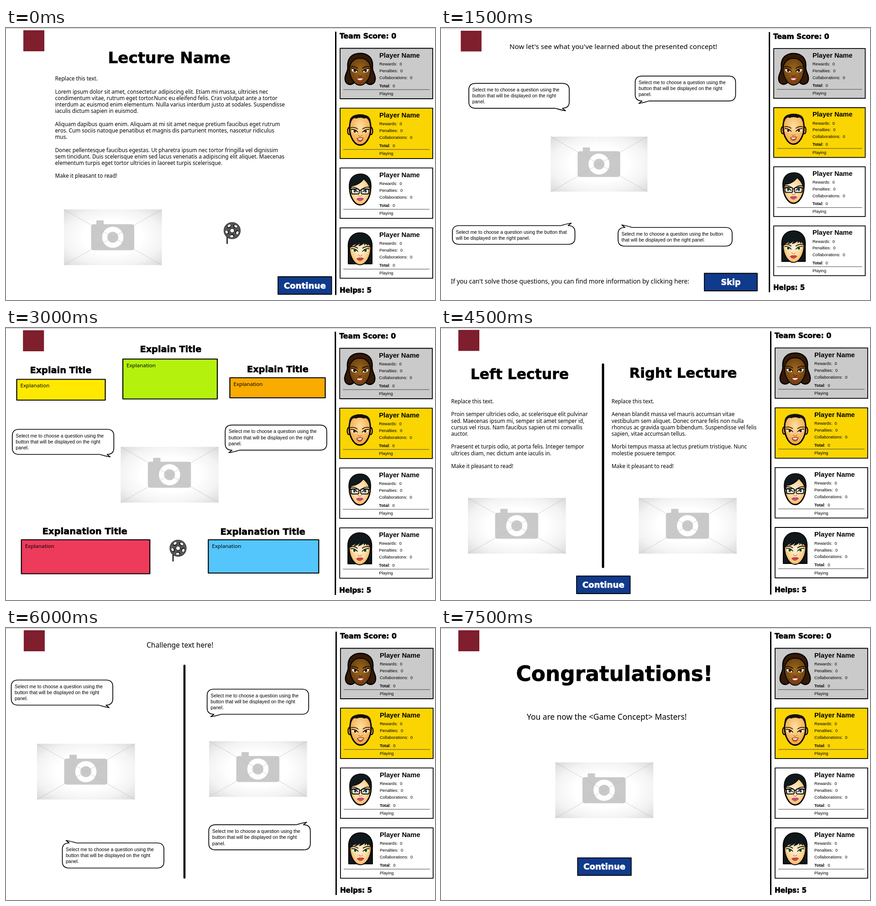
Recreate the animation shown at these times as an HTML page. Size 940 by 596 pixels, loop 9 s.

```html
<!DOCTYPE html>
<html lang="en">
<head>
<meta charset="utf-8">
<title>Lecture game screens</title>
<style>
html, body { margin: 0; width: 100%; height: 100%; overflow: hidden; background: #fff; }
svg { display: block; width: 940px; height: 596px; }
text { white-space: pre; }
.title { font-family: "DejaVu Sans", sans-serif; font-weight: 700; stroke: #000; stroke-width: .7; }
.button { font-family: "DejaVu Sans", sans-serif; font-weight: 700; fill: #fff; stroke: #fff; stroke-width: .8; stroke-linejoin: round; }
.note { font-family: "Noto Sans", sans-serif; }
.plain { font-family: "Liberation Sans", Arial, sans-serif; }
.bold { font-weight: 700; }
</style>
</head>
<body>
<svg id="stage" viewBox="0 0 940 596" xmlns="http://www.w3.org/2000/svg"></svg>
<script>
const SCENE_MS = 1500;

const esc = s => s.replace(/&/g, "&amp;").replace(/</g, "&lt;");
const text = (cls, x, y, size, s, extra = "") =>
  `<text class="${cls}" x="${x}" y="${y}" font-size="${size}" ${extra}>${esc(s)}</text>`;
const lines = (cls, x, y, size, step, rows) =>
  rows.map((row, i) => row && text(cls, x, y + i * step, size, row)).join("");
const rect = (x, y, w, h, fill, extra = "") =>
  `<rect x="${x}" y="${y}" width="${w}" height="${h}" fill="${fill}" ${extra}/>`;
const path = (d, fill, extra = "") => `<path d="${d}" fill="${fill}" ${extra}/>`;
const circle = (x, y, r, fill, extra = "") => `<circle cx="${x}" cy="${y}" r="${r}" fill="${fill}" ${extra}/>`;
const stroke = (w, color = "#000") => `stroke="${color}" stroke-width="${w}" stroke-linejoin="round"`;
const at = (x, y, body, more = "") => `<g transform="translate(${x},${y}) ${more}">${body}</g>`;
const use = (id, x = 0, y = 0, scale = 1) =>
  `<use href="#${id}" transform="translate(${x},${y}) scale(${scale})"/>`;
const title = (x, y, size, s) => text("title", x, y, size, s);

// Avatars: x is measured from the face axis, y from the top of the card.
const HEAD = "M0,15C17,15 24,27 23,45C23,62 13,81 0,81C-13,81 -23,62 -23,45C-24,27 -17,15 0,15Z";

const eyes = (y, iris, brow) => [-1, 1].map(s => at(s * 11, y,
  path("M-5,2Q0,-5 8,-4Q7,4 0,4Q-4,4 -5,2Z", "#fff") +
  circle(.8, 0, 3.2, iris) + circle(.8, 0, 1.5, "#000") +
  path("M-6,2Q0,-5.5 9,-4", "none", stroke(1.7)) +
  path("M-6,-5Q2,-11 10,-8", "none", stroke(1.8, brow)), `scale(${s},1)`)).join("");

const nose = color => path("M-4,59Q-3,62 0,62Q3,62 4,59", "none", stroke(1.3, color));

const smile = (w, lip) =>
  path(`M${-w},66Q0,64 ${w},65Q5,73 0,73Q-6,73 ${-w},66Z`, lip, stroke(.8, "#7a2216")) +
  path(`M${1.5 - w},66.5Q0,66 ${w - 1.5},66Q3,69.5 0,69.5Q-4,69.5 ${1.5 - w},66.5Z`, "#fff");

const lips = color =>
  path("M-8,68Q-3,64 0,66Q3,64 8,67.5Q3,72.5 0,72.5Q-4,72.5 -8,68Z", color, stroke(.6, "#8a2430")) +
  path("M-6,68Q0,69.5 6,67.5", "none", stroke(.8, "#8a2430"));

const faces = [
  () => path("M0,11C-19,11 -29,23 -27,42C-27,53 -34,57 -33,68C-32,80 -20,82 -13,75L13,75C20,82 32,80 33,68C34,57 27,53 27,42C29,23 19,11 0,11Z", "#351a08", stroke(2.6)) +
    path("M0,22C12,21 22,30 23,44C24,62 13,81 0,81C-13,81 -24,62 -23,44C-22,30 -12,21 0,22Z", "url(#brown)", stroke(1.8)) +
    eyes(49, "#6b3b14", "#211004") + nose("#4b2707") + smile(8, "#c73a35"),
  () => [-24, 24].map(x => `<ellipse cx="${x}" cy="50" rx="3.5" ry="8" fill="#f1a94b" ${stroke(2.2)}/>`).join("") +
    path(HEAD, "url(#tan)", stroke(3)) +
    path("M-23,37C-26,16 -11,14 0,14C11,14 26,16 23,37L20,31C18,23 12,20 9,23Q0,19 -9,23C-12,20 -18,23 -20,31Z", "#17100b") +
    eyes(51, "#a05a18", "#3a200a") + nose("#b86e22") + smile(7, "#c9562e"),
  () => path(HEAD, "url(#fair)", stroke(2.8)) +
    path("M-23,49C-28,23 -14,13 1,13C18,13 27,26 23,48L20,42C19,34 13,30 8,24C1,34 -10,39 -19,39L-20,44Z", "#10191d", stroke(1.4)) +
    eyes(51, "#4d9bc5", "#10191d") +
    [-10.5, 10.5].map(x => rect(x - 8.5, 46, 17, 11, "none", `rx="3" ${stroke(1.9)}`)).join("") +
    path("M-2,49H2M-19,48L-23,46M19,48L23,46", "none", stroke(1.9)) +
    nose("#d08b3c") + lips("#e0568c"),
  () => path("M-26,79V44C-28,21 -15,11 0,11C15,11 28,21 26,44V79Z", "#10181b", stroke(2)) +
    path(HEAD, "url(#fair)", stroke(1.8)) +
    path("M-23,46C-26,20 -11,12 0,12C11,12 26,20 23,46Q21,39 17,36L16,40L13,35L9,39L9,34Q2,40 -4,40L0,34Q-8,41 -14,40L-9,35Q-17,39 -20,42Z", "#10181b") +
    eyes(50, "#54a52d", "#10181b") + nose("#d08b3c") + lips("#e24a55")
];

const card = (fill, i) => at(0, 44.5 + i * 131.1,
  rect(732, 0, 203, 110.5, fill, stroke(1.8)) +
  at(776, 0, faces[i]()) +
  text("plain bold", 818, 20, 14.8, "Player Name") +
  lines("plain", 818, 37.6, 9.3, 14.9, ["Rewards:  0", "Penalties:  0", "Collaborations:  0"]) +
  `<text class="plain" x="818" y="85" font-size="9.3"><tspan class="bold">Total</tspan>:  0</text>` +
  path("M739,90.5H928", "none", stroke(1, "#444")) +
  text("plain", 818, 102.7, 9.3, "Playing"));

const panel = rect(38, 5, 46, 46, "#7f1e2c") +
  rect(721, 8, 3, 577, "#000") +
  title(731, 23, 15.7, "Team Score: 0") +
  ["#cacaca", "#fad502", "#fff", "#fff"].map(card).join("") +
  title(731, 579.5, 15.2, "Helps: 5");

const photo = rect(0, 0, 214.5, 122, "url(#vignette)") +
  rect(71, 24, 16, 14, "#c9c9c9") +
  rect(59.5, 32.5, 94.5, 57, "#c9c9c9", `rx="5"`) +
  circle(107, 61, 23.3, "#fff") + circle(107, 61, 12, "#c9c9c9") +
  path("M0,0L214.5,122M214.5,0L0,122", "none", stroke(.7, "#bdbdbd"));

const spokes = [0, 1, 2, 3, 4].map(i => `<g transform="rotate(${i * 72 + 18})">` +
  `<ellipse cx="11.5" rx="3.7" ry="4.7" fill="#111"/><ellipse cx="12.3" cy=".8" rx="2.5" ry="3.5" fill="#fff"/></g>`).join("");
const reel = path("M-11,8V29", "none", stroke(2.4)) +
  circle(0, 0, 17.8, "#575757", stroke(1.6, "#3c3c3c")) + spokes +
  circle(0, 0, 5.5, "#222") + circle(0, 0, 4, "#fff") + circle(-11, 37, .6, "#ccc");

const defs = `<defs>
<radialGradient id="vignette" r=".68"><stop offset=".45" stop-color="#fff"/><stop offset=".75" stop-color="#f3f3f3"/><stop offset="1" stop-color="#dcdcdc"/></radialGradient>
<radialGradient id="brown" cy=".45" r=".6"><stop offset="0" stop-color="#a06a20"/><stop offset="1" stop-color="#643b0c"/></radialGradient>
<radialGradient id="tan" cy=".4" r=".6"><stop offset="0" stop-color="#ffe0a4"/><stop offset="1" stop-color="#f0a43c"/></radialGradient>
<radialGradient id="fair" cy=".52" r=".55"><stop offset="0" stop-color="#fff0dc"/><stop offset=".6" stop-color="#fcd69a"/><stop offset="1" stop-color="#f2a83f"/></radialGradient>
<g id="panel">${panel}</g><g id="photo">${photo}</g><g id="reel">${reel}</g></defs>`;

const button = (x, y, w, label, size = 18.2) =>
  rect(x, y, w, 38.5, "#103a8b", stroke(1.8)) +
  text("button", x + w / 2, y + 25.7, size, label, `text-anchor="middle"`);

const ASK = ["Select me to choose a question using the", "button that will be displayed on the right", "panel."];

// side and end place the tail: side -1 left, 1 right; end -1 top, 1 bottom.
const bubble = (x, y, side, end, rows = ASK, w = 222.5, h = 55, size = 10.55) => {
  const d = `M15,0H${w - 15}Q${w},0 ${w},14V${h - 14}Q${w},${h} ${w - 15},${h}` +
    `L${w - 8},${h + 5.5}Q${w - 18},${h + 4} ${w - 31},${h}H15Q0,${h} 0,${h - 14}V14Q0,0 15,0Z`;
  const flip = `translate(${side < 0 ? w : 0},${end < 0 ? h : 0}) scale(${side},${end})`;
  return at(x, y, path(d, "#fff", `transform="${flip}" ${stroke(1.7)}`) +
    lines("plain", 7.5, 17.8, size, size * 1.26, rows));
};

const box = (x, y, w, h, fill) =>
  rect(x, y, w, h, fill, stroke(2.2)) + text("note", x + 8, y + 17.6, 11.55, "Explanation");

const prose = (x, y, rows) => lines("note", x, y, 11.72, 14.2, rows);
const divider = (x, y1, y2, w) => path(`M${x},${y1}V${y2}`, "none", `${stroke(w)} stroke-linecap="round"`);

const scenes = [
  use("panel") + title(223.5, 77, 34.2, "Lecture Name") +
  prose(107.5, 115.3, ["Replace this text.", "",
    "Lorem ipsum dolor sit amet, consectetur adipiscing elit. Etiam mi massa, ultricies nec",
    "condimentum vitae, rutrum eget tortor.Nunc eu eleifend felis. Cras volutpat ante a tortor",
    "interdum ac euismod enim elementum. Nulla varius interdum justo at sodales. Suspendisse",
    "iaculis dictum sapien in euismod.", "",
    "Aliquam dapibus quam enim. Aliquam at mi sit amet neque pretium faucibus eget rutrum",
    "eros. Cum sociis natoque penatibus et magnis dis parturient montes, nascetur ridiculus",
    "mus.", "",
    "Donec pellentesque faucibus egestas. Ut pharetra ipsum nec tortor fringilla vel dignissim",
    "sem tincidunt. Duis scelerisque enim sed lacus venenatis a adipiscing elit aliquet. Maecenas",
    "elementum turpis eget tortor ultricies in laoreet turpis scelerisque.", "",
    "Make it pleasant to read!"]) +
  use("photo", 127, 397.5) + use("reel", 495.5, 444) + button(596, 545, 117.5, "Continue"),

  use("panel", 5.8, 1, .988) +
  text("note", 150, 46, 15.2, "Now let's see what you've learned about the presented concept!") +
  bubble(61, 121.3, 1, 1, ASK, 220, 54.5, 10.44) + bubble(425.5, 105.3, -1, 1, ASK, 220, 54.5, 10.44) +
  bubble(25, 433, 1, -1, ["Select me to choose a question using the button that", "will be displayed on the right panel."], 268.5, 41, 10.44) +
  bubble(388, 437, -1, -1, ["Select me to choose a question using the button", "that will be displayed on the right panel."], 250, 41, 10.44) +
  use("photo", 240.5, 238, .988) +
  text("note", 21.5, 559.5, 13.67, "If you can't solve those questions, you can find more information by clicking here:") +
  button(577, 537.5, 116, "Skip", 17.7),

  use("panel", -.8) +
  title(52.5, 99, 19.3, "Explain Title") + title(293.5, 53, 19.3, "Explain Title") + title(528, 97, 19.3, "Explain Title") +
  box(23.5, 112.5, 194, 45.5, "#ffe900") + box(256, 68, 207, 87.5, "#b4f20e") + box(490.5, 109, 209, 44, "#f9ab00") +
  bubble(13.8, 222, 1, 1) + bubble(480.3, 212.7, -1, 1) + use("photo", 251.3, 260.5) +
  title(79.5, 451.5, 19.55, "Explanation Title") + title(469.5, 453, 19.55, "Explanation Title") +
  box(33.7, 464, 281.5, 74.5, "#ee3b5b") + box(443.3, 464, 242, 73, "#54c6fb") + use("reel", 377, 482.5),

  use("panel", 0, -.8) +
  title(64.5, 112, 31.5, "Left Lecture") + title(412.5, 109, 30.9, "Right Lecture") + divider(355, 80, 523.5, 5) +
  prose(22.3, 165, ["Replace this text.", "",
    "Proin semper ultricies odio, ac scelerisque elit pulvinar",
    "sed. Maecenas ipsum mi, semper sit amet semper id,",
    "cursus vel risus. Nam faucibus sapien ut mi convallis",
    "auctor.", "",
    "Praesent et turpis odio, at porta felis. Integer tempor",
    "ultrices diam, nec dictum ante iaculis in.", "",
    "Make it pleasant to read!"]) +
  prose(373.7, 165, ["Replace this text.", "",
    "Aenean blandit massa vel mauris accumsan vitae",
    "vestibulum sem aliquet. Donec ornare felis non nulla",
    "rhoncus ac gravida quam bibendum. Suspendisse vel felis",
    "sapien, vitae accumsan tellus.", "",
    "Morbi tempus massa at lectus pretium tristique. Nunc",
    "molestie posuere tempor.", "",
    "Make it pleasant to read!"]) +
  use("photo", 59, 372.3) + use("photo", 433.3, 372.3) + button(297, 543.5, 117.5, "Continue"),

  use("panel", .9) + text("note", 308, 42.7, 15.55, "Challenge text here!") + divider(391, 82.5, 547, 4.5) +
  bubble(11.5, 114, 1, 1) + bubble(440.7, 134, -1, 1) +
  use("photo", 68, 253.7) + use("photo", 445, 248) +
  bubble(123.5, 471, -1, -1) + bubble(444.3, 431.2, 1, -1),

  use("panel") + title(164.5, 116, 45.4, "Congratulations!") +
  text("note", 188, 201.3, 17.36, "You are now the <Game Concept> Masters!") +
  use("photo", 250.5, 294.5) + button(299.3, 503.7, 117.5, "Continue")
];

const stage = document.getElementById("stage");
stage.innerHTML = defs + rect(0, 0, 940, 596, "#fff") +
  scenes.map((body, i) => `<g class="scene">${rect(0, i === 1 ? 1 : 0, 940, 1, "#b4b4b4")}${body}</g>`).join("");
const groups = stage.querySelectorAll(".scene");

function draw(ms) {
  const now = Math.floor(ms / SCENE_MS) % groups.length;
  groups.forEach((g, i) => g.setAttribute("display", i === now ? "inline" : "none"));
}

function tick() {
  draw(performance.now());
  requestAnimationFrame(tick);
}
tick();
</script>
</body>
</html>
```
